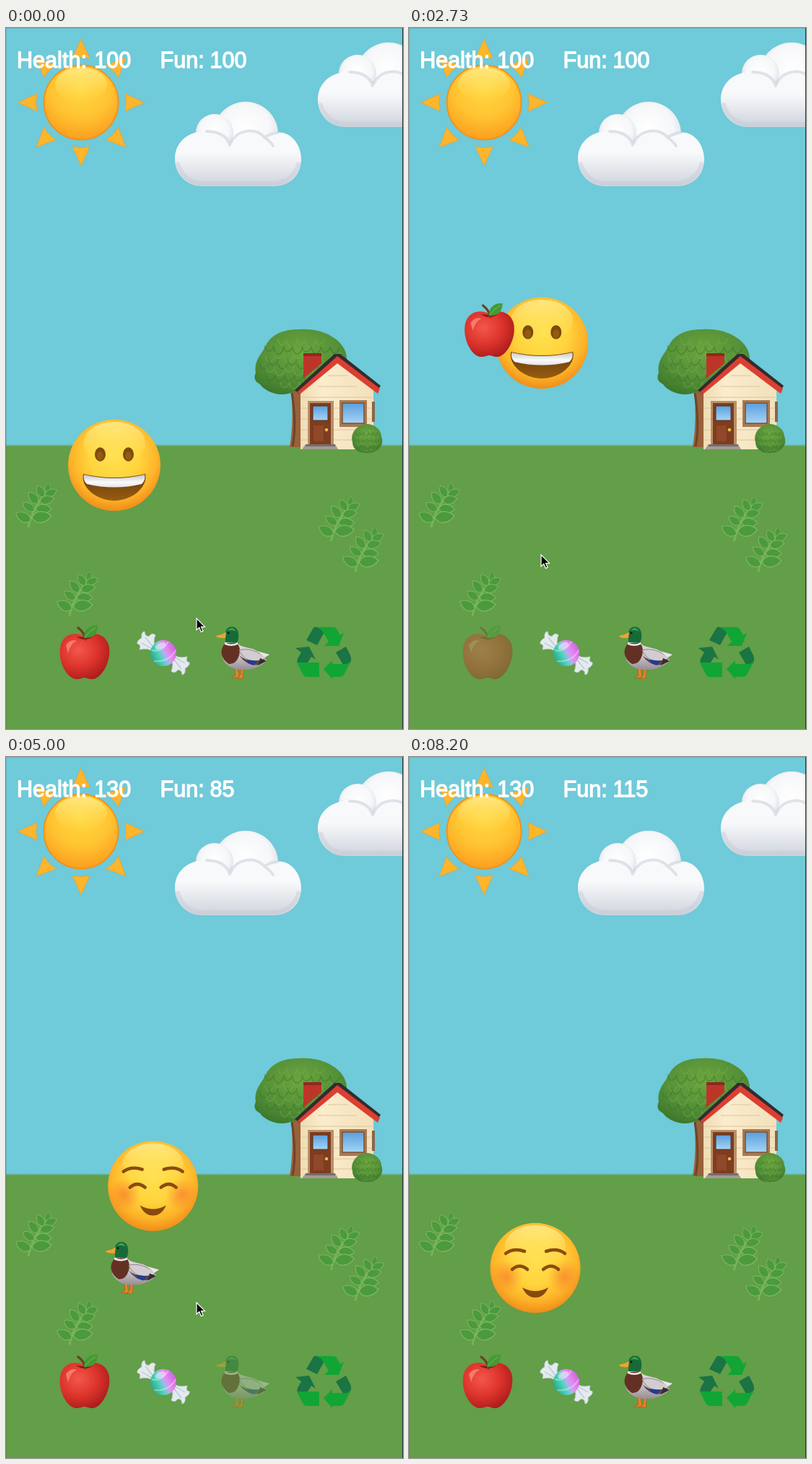
These frames come from a looping animation (550 by 970 pixels, 8270 ms). An HTML page:

```html
<!DOCTYPE html>
<html lang="en">
<head>
<meta charset="utf-8">
<title>Virtual pet</title>
<style>
html, body { margin: 0; width: 100%; height: 100%; overflow: hidden; background: #6fcad9; }
svg { display: block; width: 100%; height: 100%; }
text { font: 30.6px "Liberation Sans", Arial, sans-serif; fill: #fff; stroke: #fff; stroke-width: 1.3; }
.soft { filter: blur(.6px); }
</style>
</head>
<body>
<svg viewBox="0 0 550 970" preserveAspectRatio="none">
<defs>
  <linearGradient id="land" x1="0" y1="0" x2="0" y2="1">
    <stop offset="0" stop-color="#6fcad9"/><stop offset="1" stop-color="#639e48"/>
  </linearGradient>
  <radialGradient id="sunFill" cx=".5" cy=".3" r=".72">
    <stop offset="0" stop-color="#ffd943"/><stop offset=".55" stop-color="#ffc431"/><stop offset="1" stop-color="#fb9c1e"/>
  </radialGradient>
  <radialGradient id="skin" cx=".5" cy=".4" r=".62">
    <stop offset="0" stop-color="#ffe04e"/><stop offset=".45" stop-color="#ffd43c"/>
    <stop offset=".75" stop-color="#fdb429"/><stop offset="1" stop-color="#ee8718"/>
  </radialGradient>
  <linearGradient id="shine" x1="0" y1="0" x2="0" y2="1">
    <stop offset="0" stop-color="#fff3a0" stop-opacity=".7"/><stop offset="1" stop-color="#ffe664" stop-opacity="0"/>
  </linearGradient>
  <radialGradient id="cheek"><stop offset="0" stop-color="#f9822c" stop-opacity=".75"/><stop offset="1" stop-color="#f9822c" stop-opacity="0"/></radialGradient>
  <linearGradient id="teeth" x1="0" y1="0" x2="0" y2="1"><stop offset="0" stop-color="#c4c6cc"/><stop offset=".6" stop-color="#fafafa"/><stop offset="1" stop-color="#e3e4e8"/></linearGradient>
  <linearGradient id="mouth" x1="0" y1="0" x2="0" y2="1"><stop offset=".3" stop-color="#77450b"/><stop offset="1" stop-color="#965d11"/></linearGradient>
  <radialGradient id="puff" cx=".5" cy=".42" r=".58">
    <stop offset="0" stop-color="#fff"/><stop offset=".65" stop-color="#f6f7f9"/><stop offset="1" stop-color="#d9dde5"/>
  </radialGradient>
  <linearGradient id="cloudBase" x1="0" y1="0" x2="0" y2="1"><stop offset=".4" stop-color="#f8f9fb"/><stop offset="1" stop-color="#ced3dc"/></linearGradient>
  <radialGradient id="foliage" cx=".5" cy=".35" r=".7"><stop offset="0" stop-color="#6ba53f"/><stop offset=".6" stop-color="#549038"/><stop offset="1" stop-color="#3b772b"/></radialGradient>
  <linearGradient id="glass" x1="0" y1="0" x2="0" y2="1"><stop offset="0" stop-color="#5b9fdd"/><stop offset="1" stop-color="#a4d5f5"/></linearGradient>
  <linearGradient id="wall" x1="0" y1="0" x2="1" y2="0"><stop offset="0" stop-color="#efdcb4"/><stop offset=".3" stop-color="#fbeccd"/><stop offset="1" stop-color="#f3e0bb"/></linearGradient>
  <radialGradient id="red" cx=".38" cy=".36" r=".68"><stop offset="0" stop-color="#f4574b"/><stop offset=".55" stop-color="#dd342c"/><stop offset="1" stop-color="#ad1d1c"/></radialGradient>
  <linearGradient id="sweet" x1="0" y1=".75" x2="1" y2=".25">
    <stop offset="0" stop-color="#22a184"/><stop offset=".35" stop-color="#4fd3b8"/><stop offset=".5" stop-color="#a2b7ee"/>
    <stop offset=".65" stop-color="#e88af0"/><stop offset="1" stop-color="#c95ce0"/>
  </linearGradient>
  <linearGradient id="body" x1="0" y1="0" x2="0" y2="1"><stop offset="0" stop-color="#e4dfe1"/><stop offset=".5" stop-color="#cbc4c9"/><stop offset="1" stop-color="#978d95"/></linearGradient>

  <g id="cloud">
    <circle cx="332" cy="147" r="45" fill="url(#puff)"/>
    <circle cx="289" cy="145" r="26" fill="url(#puff)"/>
    <path d="M273 143C294 140 306 148 311 162C318 142 342 134 359 151C388 132 409 158 409 181C409 204 393 219 371 219H272C249 219 234 201 234 181C234 160 250 144 273 143Z" fill="url(#cloudBase)"/>
    <g fill="none" stroke="#c6ccd6" stroke-width="4" stroke-linecap="round" opacity=".5">
      <path d="M278 143C296 143 306 150 310 162M311 160C318 142 344 135 359 152Q367 158 370 163M359 151Q366 146 376 145"/>
    </g>
    <path d="M237 186Q246 215 274 215H371Q400 212 406 186" fill="none" stroke="#c0c6d1" stroke-width="6" opacity=".4"/>
  </g>

  <path id="leaf" d="M0 0C-8 -4 -7 -14 0 -20C7 -14 8 -4 0 0Z"/>
  <g id="sprig" fill="#4c9a3e" stroke="#7fb963" stroke-width="1">
    <path d="M31 691Q35 667 58 640" fill="none" stroke="#74b556" stroke-width="3"/>
    <use href="#leaf" transform="translate(57 643) rotate(8) scale(.68)"/>
    <use href="#leaf" transform="translate(52 649) rotate(-28) scale(.9)"/>
    <use href="#leaf" transform="translate(54 647) rotate(65) scale(.9)"/>
    <use href="#leaf" transform="translate(44 658) rotate(-38)"/>
    <use href="#leaf" transform="translate(47 655) rotate(78)"/>
    <use href="#leaf" transform="translate(39 668) rotate(-55) scale(.95)"/>
    <use href="#leaf" transform="translate(41 665) rotate(92) scale(1.1)"/>
    <use href="#leaf" transform="translate(34 682) rotate(-62) scale(1.15)"/>
    <use href="#leaf" transform="translate(36 678) rotate(84) scale(1.35)"/>
  </g>

  <g id="apple">
    <path d="M109 842C118 835 137 837 142 853C148 874 132 902 119 901C114 901 112 899 109 899C106 899 103 901 98 901C84 901 70 874 76 853C82 836 100 836 109 842Z" fill="url(#red)"/>
    <path d="M97 842Q109 850 121 842Q110 844 97 842Z" fill="#8a1515"/>
    <path d="M83 854Q89 845 98 848Q89 852 86 865Z" fill="#ff9a8a" opacity=".65"/>
    <path d="M110 846Q109 837 100 830" fill="none" stroke="#6b4226" stroke-width="3.2" stroke-linecap="round"/>
    <path d="M108 844C108 832 116 826 127 827C127 839 120 845 108 844Z" fill="#439a35"/>
    <path d="M110 842Q116 834 124 830" fill="none" stroke="#78bd50"/>
  </g>

  <g id="candy">
    <g id="wrap"><path d="M207 858Q203 848 207 840Q202 836 198 842Q192 842 192 835Q187 836 188 844Q181 848 182 852Q188 853 185 860Q197 857 204 863Z" fill="#e4eaee" stroke="#c3d1d7"/>
    <path d="M204 857L193 843M202 859L188 851" stroke="#b6c9d2" stroke-width="1.3"/></g>
    <use href="#wrap" transform="rotate(180 218 865)"/>
    <circle cx="218" cy="865" r="18" fill="url(#sweet)"/>
    <path d="M202 861Q216 865 225 849M205 876Q226 878 235 861" fill="none" stroke="#fff" stroke-width="2" opacity=".35"/>
    <ellipse cx="214" cy="855" rx="8" ry="4" fill="#fff" opacity=".45" transform="rotate(-25 214 855)"/>
  </g>

  <g id="duck">
    <path d="M317 885L318 896L312 899H323L321 886ZM325 885V895L319 900H328L329 885Z" fill="#e58428" stroke="#b95d1b" stroke-width=".8"/>
    <path d="M304 850H320C324 858 338 856 348 862L365 867L359 871L361 876C352 885 338 889 324 888C307 887 296 873 300 861Z" fill="url(#body)"/>
    <path d="M304 851H320Q326 858 323 868Q319 881 309 880C296 872 296 859 304 851Z" fill="#633124"/>
    <path d="M323 861C336 857 350 863 360 872C348 880 331 878 323 861Z" fill="#d3cdd2" stroke="#8f858a" stroke-width="1"/>
    <path d="M323 868Q336 880 359 873L351 881Q334 884 323 868Z" fill="#55474a"/>
    <path d="M334 874L348 876L343 882L335 879Z" fill="#263a90"/>
    <path d="M349 863L365 867L358 871Z" fill="#e9e5e8"/><path d="M352 872L361 876L349 882Z" fill="#382d30"/>
    <path d="M304 850L304 838C304 826 321 825 322 838Q323 845 320 851Z" fill="#176a38"/>
    <path d="M307 834Q313 826 319 835Q313 832 307 834Z" fill="#38a356"/>
    <path d="M303 850Q312 855 321 850V853Q312 857 303 853Z" fill="#eee"/>
    <path d="M305 836L299 839L291 841Q292 845 304 844Z" fill="#f1a42c"/>
    <circle cx="308" cy="837" r="1.5" fill="#111"/>
  </g>

  <g id="recycle">
    <path d="M416 847L426 830Q428 828 431 829L442 834L431 854ZM457 864L471 856L477 868Q480 876 475 881H467ZM401 858L420 856L429 874L423 870L416 881H406Q402 878 404 873L409 864Z" fill="#1a7443"/>
    <path d="M430 829H453Q457 829 459 833L463 840L468 837L461 855H441L447 849L437 833ZM478 876L468 895Q466 898 461 898H452V901L440 887L452 875V880H472ZM403 878H434V898H417Q413 898 411 894Z" fill="#11a536"/>
  </g>

  <g id="head"><ellipse rx="64" ry="63.3" fill="url(#skin)"/><ellipse cy="-31" rx="43" ry="29" fill="url(#shine)"/></g>
  <g id="eyes" fill="#7d4a0c"><ellipse cx="-19.5" cy="-15" rx="7.5" ry="9.7"/><ellipse cx="19.5" cy="-15" rx="7.5" ry="9.7"/>
    <ellipse cx="-19.5" cy="-13" rx="4.5" ry="6" fill="#945a10"/><ellipse cx="19.5" cy="-13" rx="4.5" ry="6" fill="#945a10"/></g>
</defs>

<rect width="550" height="577" fill="#6fcad9"/>
<rect y="578" width="550" height="392" fill="#639e48"/>
<rect y="576" width="550" height="3" fill="url(#land)"/>

<g class="soft">
  <g id="sun" fill="#fdb52b" stroke="#efa32c" stroke-width=".8">
    <circle cx="104" cy="103" r="51.5" fill="url(#sunFill)" stroke="#f0921b" stroke-width="2"/>
  </g>
  <ellipse cx="104" cy="78" rx="36" ry="23" fill="url(#shine)"/>
  <use href="#cloud"/><use href="#cloud" x="198" y="-82"/>

  <path d="M395 496L408 490L418 503V580H393Q399 545 395 496Z" fill="#99613a"/>
  <path d="M396 505Q403 550 397 579" fill="none" stroke="#714326" stroke-width="3"/>
  <path d="M346 477C343 460 354 452 359 441C367 424 383 417 407 417C435 415 459 427 468 443C480 465 464 490 438 497C422 506 407 500 391 506C374 510 357 501 352 493C344 489 343 484 346 477Z" fill="url(#foliage)"/>
  <g id="leaves" fill="none" stroke-width="1.5"/>
  <path d="M412 450H437V464L412 485Z" fill="#bd3529"/><path d="M412 450H437V454H412Z" fill="#8d2920"/>
  <path d="M408 503L459 461L509 501V583H408Z" fill="url(#wall)"/>
  <path d="M408 511H508M408 526H508M408 541H508M408 556H508M408 570H508M432 496H486M446 481H474" stroke="#dcc69a" stroke-width="1"/>
  <path d="M400 501L455 451H463L519 495L516 500L459 460L406 506Z" fill="#332c2e"/>
  <path d="M403 504L459 454L518 499L515 506L459 464L408 506Z" fill="#db3f32"/>
  <path d="M418 516H454V579H418Z" fill="#b99068"/><path d="M421 519H450V577H421Z" fill="#7e3c20"/>
  <path d="M425 523H446V543H425Z" fill="url(#glass)" stroke="#57301c"/>
  <path d="M426 550H440V572H426Z" fill="#8f4828"/><circle cx="444" cy="556" r="2.3" fill="#edbd45"/>
  <path d="M462 515H500V552H462Z" fill="#a8794f"/><path d="M466 519H496V547H466Z" fill="url(#glass)" stroke="#795238" stroke-width="1.5"/>
  <path d="M507 517H511V545H507Z" fill="#8a654a"/>
  <path d="M415 576H456L460 583H410Z" fill="#a39a94"/><path d="M415 576H456V579H415Z" fill="#776e6c"/>
  <path d="M480 573C477 562 484 552 494 549C507 545 520 555 520 565C525 577 515 588 501 588C489 589 480 583 480 573Z" fill="url(#foliage)"/>
  <g id="bush" fill="none" stroke-width="1"/>

  <use href="#sprig"/><use href="#sprig" x="419.500" y="19"/><use href="#sprig" x="453" y="61.500"/><use href="#sprig" x="57" y="122.500"/>

  <g id="tray"><use href="#apple"/><use href="#candy"/><use href="#duck"/><use href="#recycle"/></g>

  <g id="pet">
    <g><use href="#head"/><use href="#eyes"/>
      <path d="M-43 12Q0 22 43 12C47 29 26 49 0 49C-26 49 -47 29 -43 12Z" fill="url(#mouth)"/>
      <path d="M-42 13Q0 23 42 13Q44 20 38 26Q0 35 -38 26Q-44 20 -42 13Z" fill="url(#teeth)"/></g>
    <g><use href="#head" transform="scale(.977 .985)"/>
      <circle cx="-40" cy="12" r="23" fill="url(#cheek)"/><circle cx="40" cy="12" r="23" fill="url(#cheek)"/>
      <path d="M-41 -20Q-30 -28 -15 -23M41 -20Q30 -28 15 -23M-32 2Q-22 -7 -11 2M32 2Q22 -7 11 2" fill="none" stroke="#8a4c10" stroke-width="4.5" stroke-linecap="round"/>
      <path d="M-18 27Q0 37 18 27Q12 41 0 41Q-12 41 -18 27Z" fill="#874a0d"/></g>
    <g><use href="#head"/><use href="#eyes"/><ellipse cy="27.500" rx="15" ry="14.500" fill="#7d4a0c"/><ellipse cy="32" rx="11" ry="8" fill="#9a5d12"/></g>
    <g><use href="#head"/><use href="#eyes"/><ellipse cy="28" rx="18" ry="21" fill="#7d4a0c"/><ellipse cy="34" rx="13" ry="12" fill="#9a5d12"/></g>
  </g>
  <use id="item" href="#apple"/>
</g>

<g class="soft">
  <text x="15" y="55">Health:</text><text id="health" x="122.200" y="55"></text>
  <text x="213.500" y="55">Fun:</text><text id="fun" x="282.500" y="55"></text>
</g>
<path id="cursor" d="M0 0V16L3.700 12.600L6.400 18.600L9 17.400L6.500 11.600H11.500Z" fill="#000" stroke="#fff" stroke-width="1.2"/>
<path d="M549.500 0V970" stroke="#26343a"/>
<path d="M0 .5H549M.5 0V970" stroke="#345" opacity=".18"/>
</svg>
<script>
const LOOP = 8270, STEP = LOOP / 124;
const WALK = 700, CHEW = 714, SPIN = 1000, SPIN_START = 5549;
const $ = id => document.getElementById(id);

function add(parent, d, attrs = {}) {
  const path = document.createElementNS('http://www.w3.org/2000/svg', 'path');
  path.setAttribute('d', d);
  for (const key in attrs) path.setAttribute(key, attrs[key]);
  parent.append(path);
}

for (let i = 0; i < 8; i++)
  add($('sun'), 'M104 15.500L116 42Q104 39 92 42Z', { transform: `rotate(${i * 45} 104 103)` });

// Scalloped leaf rows inside an ellipse
function scallops(group, cx, cy, rx, ry, size) {
  for (let y = -ry, row = 0; y < ry; y += size * .75, row++) {
    const half = rx * Math.sqrt(1 - (y / ry) ** 2);
    for (let x = -half + (row % 2) * size / 2; x < half - size / 2; x += size) {
      const dy = Math.sin(x * 1.7 + row) * size / 5;
      add(group, `M${cx + x} ${cy + y + dy}q${size * .15} ${size * .7} ${size * .5} ${size * .6}q${size * .4} ${-size * .1} ${size * .5} ${-size * .6}`,
        { stroke: row % 2 ? '#78ad45' : '#397328', opacity: .5 });
    }
  }
}
scallops($('leaves'), 408, 460, 57, 38, 13);
scallops($('bush'), 500, 568, 18, 17, 6);

const start = [150, 605], dropped = [217, 444];
const grab = 650, release = 1250;

// Each placed treat: time, kind, its centre and the centre of its tray picture
const treats = [
  { at: 2516, kind: 'apple', to: [112, 418], home: [109.5, 864] },
  { at: 3628, kind: 'apple', to: [216.5, 543], home: [109.5, 864] },
  { at: 4786, kind: 'duck', to: [175, 707], home: [328, 864.5] }
];
const chewing = [1, 2, 3, 2, 1];

const pointer = [
  [0, 264, 817], [500, 150, 605], [grab, 150, 605], [release, 217, 444], [1350, 217, 444],
  [1800, 143, 914], [1900, 125, 942], [2100, 112, 865], [2200, 112, 865], [2470, 112, 418],
  [2530, 112, 418], [2733, 183, 729], [3350, 217, 542], [3690, 217, 542], [4100, 300, 934],
  [4330, 327, 868], [4450, 327, 868], [4740, 175, 707], [4800, 175, 707], [5000, 264, 755],
  [5420, 441, 869], [6300, 441, 869], [6700, 570, 830], [LOOP, 570, 830]
];

const stats = [[0, 100, 100], [3216, 120, 100], [4328, 130, 85], [5486, 130, 105], [SPIN_START + SPIN, 130, 115]];

// Tray place, time picked, time let go
const picks = [[0, 2120, 4400], [2, 4400, SPIN_START], [3, SPIN_START, SPIN_START + SPIN]];

const mix = (a, b, k) => a + (b - a) * k;
const between = (t, from, to) => t >= from && t < to;

function pointerAt(t) {
  const i = pointer.findIndex(p => p[0] > t);
  const [a, b] = [pointer[i - 1], pointer[i]];
  const k = (t - a[0]) / (b[0] - a[0]), ease = k * k * (3 - 2 * k);
  return [mix(a[1], b[1], ease), mix(a[2], b[2], ease)];
}

function petAt(t) {
  if (t < grab) return start;
  if (t < release) return pointerAt(t);
  let place = dropped;
  for (const { at, to } of treats) {
    if (t < at) break;
    const k = Math.min(1, (t - at) / WALK);
    place = place.map((v, i) => mix(v, to[i], k));
  }
  return place;
}

function faceAt(t) {
  const eaten = treats.filter(treat => treat.at + WALK <= t).pop();
  if (!eaten) return 0;
  const beat = Math.floor((t - eaten.at - WALK) / CHEW * chewing.length);
  return chewing[Math.min(beat, chewing.length - 1)];
}

function draw(t) {
  const [x, y] = petAt(t);
  const angle = between(t, SPIN_START, SPIN_START + SPIN) ? (t - SPIN_START) / SPIN * 720 : 0;
  $('pet').setAttribute('transform', `translate(${x} ${y}) rotate(${angle})`);
  const face = faceAt(t);
  [...$('pet').children].forEach((g, i) => g.setAttribute('display', i === face ? 'inline' : 'none'));

  const treat = treats.find(({ at }) => between(t, at, at + WALK));
  $('item').setAttribute('display', treat ? 'inline' : 'none');
  if (treat) {
    $('item').setAttribute('href', '#' + treat.kind);
    $('item').setAttribute('transform', `translate(${treat.to[0] - treat.home[0]} ${treat.to[1] - treat.home[1]})`);
  }

  [...$('tray').children].forEach((icon, i) => {
    const picked = picks.some(([place, from, to]) => place === i && between(t, from, to));
    icon.setAttribute('opacity', picked ? .4 : 1);
  });

  const [, health, fun] = stats.filter(s => s[0] <= t).pop();
  $('health').textContent = health;
  $('fun').textContent = fun;
  $('cursor').setAttribute('transform', `translate(${pointerAt(t).join(' ')})`);
}

const begin = performance.now();
function tick() {
  const t = (performance.now() - begin) % LOOP;
  draw(Math.min(123, Math.floor((t + 8) / STEP)) * STEP);
  requestAnimationFrame(tick);
}
tick();
</script>
</body>
</html>
```
